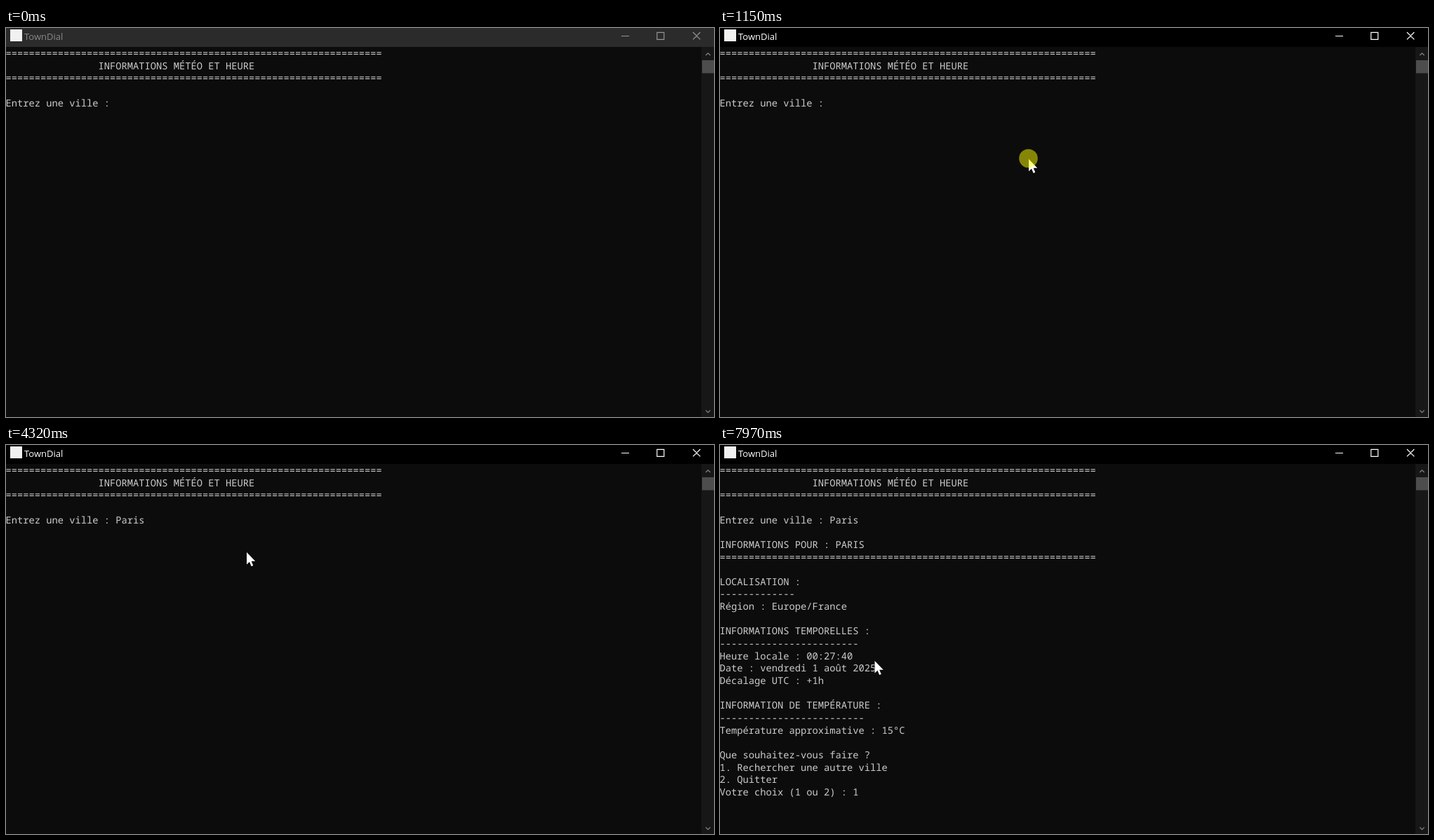
Recreate the animation shown at these times as an HTML page. Size 1009x555 px, loop 8 s.

```html
<!DOCTYPE html>
<html lang="fr">
<head>
<meta charset="utf-8">
<title>TownDial</title>
<style>
  html, body { margin: 0; width: 100%; height: 100%; overflow: hidden; background: #0c0c0c; }
  svg { display: block; }
  #screen text {
    font: 13.75px "Noto Sans Mono", monospace;
    fill: #ccc; white-space: pre;
    text-rendering: geometricPrecision; font-variant-ligatures: none;
  }
  #caption { font: 13px "Open Sans", sans-serif; }
  .line { fill: none; stroke-width: 1.2; }
</style>
</head>
<body>
<svg width="1009" height="555" viewBox="0 0 1009 555">
  <rect width="1009" height="555" fill="#0c0c0c"/>
  <g id="screen"></g>
  <rect id="caret" width="8.5" height="4.2" fill="#f2f2f2"/>

  <rect id="bar" width="1009" height="27"/>
  <rect x="6" y="2" width="17" height="17" fill="#f1f1ef"/>
  <text id="caption" x="26" y="17">TownDial</text>
  <path id="buttons" class="line" d="M877 11.5h11 M927.8 6.3h10v10h-10z M979 6l10.4 10.4 M989.4 6l-10.4 10.4"/>

  <rect x="991" y="27" width="18" height="528" fill="#171717"/>
  <rect x="992" y="46" width="17" height="18.5" fill="#4d4d4d"/>
  <path class="line" stroke="#858585" d="M997.3 39l3.2-3.2 3.2 3.2 M997.3 545.4l3.2 3.2 3.2-3.2"/>

  <path id="pointer" d="M0 0V17.6L4 13.8 6.6 20 9.3 18.9 6.7 12.8H12.3Z" fill="#fff" stroke="#000" stroke-width="1" paint-order="stroke"/>
  <circle id="click" cx="439.5" cy="186" r="13.3" fill="#ff0" opacity=".5"/>
</svg>
<script>
const LOOP = 8000, TOP = 27, LEFT = -0.5, ROW = 17.65, COL = 8.25;
const RULE = "=".repeat(65);
const CITY_ROW = 4, MENU_ROW = 23, CHOICE_ROW = 26;
const CITY_PROMPT = "Entrez une ville : ", CHOICE_PROMPT = "Votre choix (1 ou 2) : ";
const CITY = "Paris", CHOICE = "1";
const REPORT_TIME = 4650, MENU_TIME = 4690, FOCUS_TIME = 1150, CLICK_END = 1380;

const lines = [
  RULE, " ".repeat(16) + "INFORMATIONS MÉTÉO ET HEURE", RULE, "",
  CITY_PROMPT, "",
  "INFORMATIONS POUR : PARIS", RULE, "",
  "LOCALISATION :", "-".repeat(13), "Région : Europe/France", "",
  "INFORMATIONS TEMPORELLES :", "-".repeat(24),
  "Heure locale : 00:27:40", "Date : vendredi 1 août 2025", "Décalage UTC : +1h", "",
  "INFORMATION DE TEMPÉRATURE :", "-".repeat(25), "Température approximative : 15°C", "",
  "Que souhaitez-vous faire ?", "1. Rechercher une autre ville", "2. Quitter",
  CHOICE_PROMPT
];

// [time, typed characters, caret visible]
const cityKeys = [
  [0, 0, 0], [1710, 0, 1], [2240, 0, 0], [2620, 1, 0], [2720, 1, 1], [3070, 2, 1], [3300, 2, 0],
  [3550, 3, 1], [3750, 4, 0], [3800, 4, 1], [3980, 5, 1], [4320, 5, 0]
];
const choiceKeys = [
  [4690, 0, 1], [5390, 0, 0], [5900, 0, 1], [6440, 0, 0], [6930, 0, 1], [7470, 0, 0],
  [7670, 1, 1], [7970, 1, 0]
];

const moves = [
  { start: 480, end: 900, steps: 10, from: [898, 527], to: [440, 187] },
  { start: 1860, end: 1960, steps: 3, from: [420, 181], to: [343, 153] },
  { start: 5390, end: 5550, steps: 4, from: [325, 174], to: [220.5, 308] }
];

const $ = id => document.getElementById(id);
const show = (el, visible) => el.setAttribute("visibility", visible ? "visible" : "hidden");
const latest = (list, t, time) => list.filter(item => time(item) <= t).pop();

const rows = lines.map((line, i) => {
  const el = document.createElementNS("http://www.w3.org/2000/svg", "text");
  el.setAttribute("x", LEFT);
  el.setAttribute("y", TOP + ROW * (i + 1) - 3.7);
  el.textContent = line;
  $("screen").append(el);
  return el;
});

function drawInput(t) {
  const choosing = t >= MENU_TIME;
  const [, typed, caretOn] = latest(choosing ? choiceKeys : cityKeys, t, key => key[0]);
  const row = choosing ? CHOICE_ROW : CITY_ROW;
  const prompt = choosing ? CHOICE_PROMPT : CITY_PROMPT;
  rows[CITY_ROW].textContent = CITY_PROMPT + (choosing ? CITY : CITY.slice(0, typed));
  rows[CHOICE_ROW].textContent = CHOICE_PROMPT + (choosing ? CHOICE.slice(0, typed) : "");
  $("caret").setAttribute("x", LEFT + COL * (prompt.length + typed));
  $("caret").setAttribute("y", TOP + ROW * (row + 1) - 4.2);
  show($("caret"), caretOn);
}

function drawPointer(t) {
  const move = latest(moves, t, m => m.start);
  show($("pointer"), move);
  if (!move) return;
  const { start, end, steps, from, to } = move;
  const progress = Math.min(1, (t - start) / (end - start));
  const p = Math.floor(progress * (steps - 1) + 1e-6) / (steps - 1);
  const eased = 1 - (1 - p) ** 2;
  const [x, y] = from.map((a, i) => a + (to[i] - a) * eased);
  $("pointer").setAttribute("transform", `translate(${x} ${y})`);
}

function draw(t) {
  const focused = t >= FOCUS_TIME;
  $("bar").setAttribute("fill", focused ? "#000" : "#2b2b2b");
  $("caption").setAttribute("fill", focused ? "#fff" : "#888");
  $("buttons").setAttribute("stroke", focused ? "#fff" : "#959595");
  show($("click"), focused && t < CLICK_END);
  rows.forEach((el, i) => show(el, i <= CITY_ROW || t >= (i < MENU_ROW ? REPORT_TIME : MENU_TIME)));
  drawInput(t);
  drawPointer(t);
}

const origin = performance.now();
function tick() {
  draw((performance.now() - origin) % LOOP);
  requestAnimationFrame(tick);
}
tick();
</script>
</body>
</html>
```
